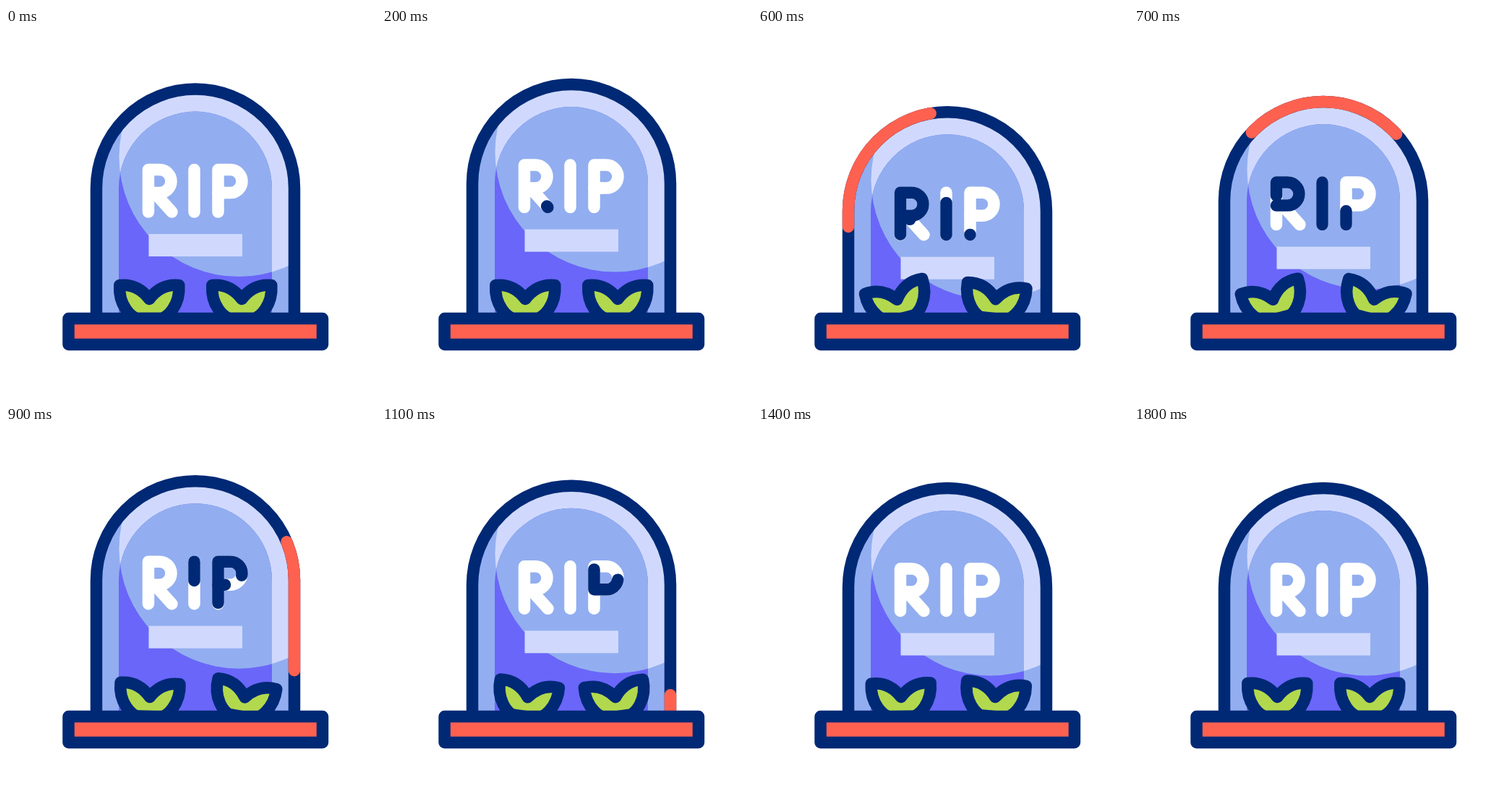
Animation of 512 by 512 pixels, one loop 2.5 s. Source, as an HTML page with a canvas:

```html
<!DOCTYPE html>
<html lang="en">
<head>
<meta charset="utf-8">
<title>Tombstone</title>
<style>
  html, body { margin: 0; width: 100%; height: 100%; overflow: hidden; background: #fff; }
  canvas { display: block; width: 512px; height: 512px; }
</style>
</head>
<body>
<canvas id="stage" width="512" height="512"></canvas>
<script>
const ctx = document.getElementById('stage').getContext('2d');
const LOOP = 2500, STEP = 100, LAST = 1800;
const NAVY = '#002975', RED = '#ff6150', BLUE = '#92aef0',
      PALE = '#d0d9fd', VIOLET = '#6a66f9', GREEN = '#b2d94d';

const smooth = x => x * x * (3 - 2 * x);

// Eased value at time t through [time, value] keys.
function track(t, keys) {
  if (t <= keys[0][0]) return keys[0][1];
  for (let i = 1; i < keys.length; i++) {
    const [t0, v0] = keys[i - 1], [t1, v1] = keys[i];
    if (t < t1) return v0 + (v1 - v0) * smooth((t - t0) / (t1 - t0));
  }
  return keys[keys.length - 1][1];
}

const progress = (t, [from, to]) => track(t, [[from, 0], [to, 1]]);

const stoneLift = [[-38, 0], [140, -12], [480, 38], [960, -12], [1172, 0]];
const leftSway = [[300, 0], [660, -16], [1040, 9.5], [1330, -1], [1600, 0]];
const rightSway = [[300, 0], [430, -4], [790, 18], [1100, -8], [1350, 5.5], [1650, 0]];

// Arch shape: straight legs joined by a half circle around (262, 223).
function arch(radius, leg = 200) {
  const p = new Path2D();
  p.moveTo(262 - radius, 223 + leg);
  p.lineTo(262 - radius, 223);
  p.arc(262, 223, radius, Math.PI, 0);
  p.lineTo(262 + radius, 223 + leg);
  return p;
}

function line(...points) {
  const p = new Path2D();
  points.forEach(([x, y]) => p.lineTo(x, y));
  return p;
}

// Stem from the bottom up, around the bowl and back; "extra" runs up the stem again.
const TOP = 197.5, MID = 229.5, FOOT = 256, BOWL = 16;
function bowlLetter(x, straight, extra) {
  const path = line([x, FOOT], [x, TOP], [x + straight, TOP]);
  path.arc(x + straight, TOP + BOWL, BOWL, -Math.PI / 2, Math.PI / 2);
  path.lineTo(x, MID);
  if (extra) path.lineTo(x, MID - extra);
  return { path, length: FOOT - TOP + 2 * straight + Math.PI * BOWL + extra };
}

const outline = { path: arch(137), length: 400 + Math.PI * 137, head: [167, 1067], tail: [331, 1231] };
const letters = [
  { ...bowlLetter(197, 15.5, 0), head: [260, 593], tail: [590, 900] },
  { path: line([229.5, FOOT], [207, 231]), length: 34, head: [170, 370], tail: [450, 650] },
  { path: line([260.5, FOOT], [260.5, TOP]), length: 58.5, head: [410, 690], tail: [740, 1040] },
  { ...bowlLetter(293.5, 17, 30), head: [587, 1139], tail: [880, 1270] },
  { path: line([293.5, MID], [303, MID]), length: 9.5, head: [750, 850], tail: [1000, 1100] }
];

function stroke(path, color, width) {
  ctx.strokeStyle = color;
  ctx.lineWidth = width;
  ctx.stroke(path);
}

function fill(path, color) {
  ctx.fillStyle = color;
  ctx.fill(path);
}

// Draws only the part of a path between its moving tail and head.
function strokeTrimmed(part, t, color, width) {
  const from = progress(t, part.tail) * part.length;
  const to = progress(t, part.head) * part.length;
  if (to - from < 0.01) return;
  ctx.setLineDash([to - from, 5000]);
  ctx.lineDashOffset = -from;
  stroke(part.path, color, width);
  ctx.setLineDash([]);
}

const body = arch(137), panel = arch(106);
const shine = new Path2D();
shine.arc(322, 180, 165.5, 0, Math.PI * 2);

function drawStone(t) {
  ctx.save();
  ctx.beginPath();
  ctx.rect(0, 0, 512, 420);
  ctx.clip();
  ctx.translate(0, track(t, stoneLift));

  fill(body, BLUE);
  ctx.save();
  ctx.clip(body);
  fill(shine, PALE);
  ctx.restore();

  fill(panel, VIOLET);
  ctx.save();
  ctx.clip(panel);
  fill(shine, BLUE);
  ctx.restore();

  ctx.fillStyle = PALE;
  ctx.fillRect(197.5, 286.5, 129.5, 31);

  stroke(outline.path, NAVY, 16.5);
  strokeTrimmed(outline, t, RED, 16.5);

  letters.forEach(part => stroke(part.path, '#fff', 16.5));
  letters.forEach(part => strokeTrimmed(part, t, NAVY, 16.5));
  ctx.restore();
}

// Two leaves, measured from the point where the plant is rooted.
const leaves = new Path2D('M-41 -42C-22 -44 -9 -35 0 -23C9 -35 22 -44 41 -42' +
  'C43 -14 24 4 16 4L-16 4C-24 4 -43 -14 -41 -42Z');

function drawPlant(x, degrees) {
  ctx.save();
  ctx.translate(x, 398);
  ctx.rotate(degrees * Math.PI / 180);
  fill(leaves, GREEN);
  stroke(leaves, NAVY, 16.5);
  ctx.restore();
}

function drawBase() {
  const slab = new Path2D();
  slab.rect(86.5, 402, 351.5, 36);
  fill(slab, RED);
  stroke(slab, NAVY, 16.5);
}

function draw(t) {
  ctx.fillStyle = '#fff';
  ctx.fillRect(0, 0, 512, 512);
  ctx.lineCap = ctx.lineJoin = 'round';
  drawStone(t);
  drawPlant(198.3, track(t, leftSway));
  drawPlant(326.3, track(t, rightSway));
  drawBase();
}

const start = performance.now();
function tick() {
  const t = (performance.now() - start) % LOOP;
  draw(Math.min(LAST, Math.floor(t / STEP) * STEP));
  requestAnimationFrame(tick);
}
tick();
</script>
</body>
</html>
```
